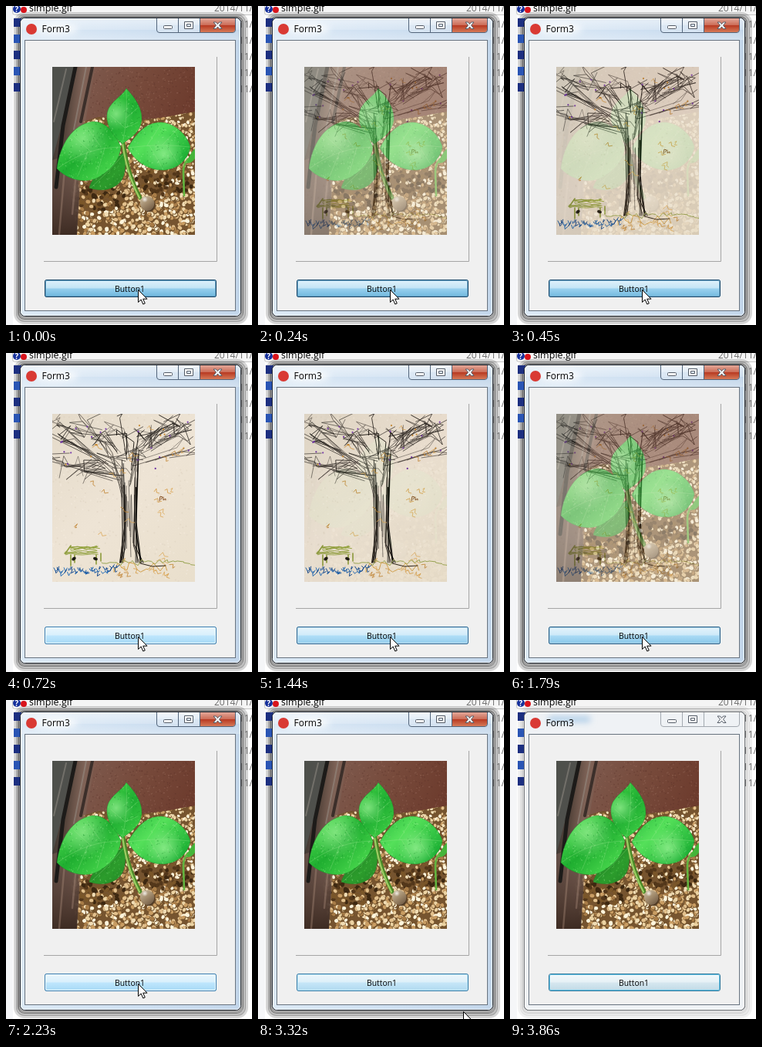
An HTML page with a canvas that plays this animation: 319x414 px, repeating every 3.91 s.

```html
<!DOCTYPE html>
<html lang="en">
<head>
<meta charset="utf-8">
<title>Form3</title>
<style>
html, body { margin: 0; width: 100%; height: 100%; overflow: hidden; background: #fff }
svg { position: absolute; left: 0; top: 0 }
canvas { position: absolute; left: 60px; top: 79px }
text { font-family: "Open Sans", "Noto Sans", sans-serif; font-size: 12px }
</style>
</head>
<body>
<svg width="319" height="414" viewBox="0 0 319 414">
  <defs>
    <linearGradient id="glass" x2="1" y2="0">
      <stop stop-color="#dce9f5"/><stop offset=".45" stop-color="#d0e1f2"/><stop offset="1" stop-color="#c3d6ea"/>
    </linearGradient>
    <linearGradient id="shine" x2="0" y2="1">
      <stop stop-color="#fff" stop-opacity=".5"/><stop offset=".5" stop-color="#fff" stop-opacity=".2"/>
      <stop offset=".52" stop-color="#fff" stop-opacity="0"/><stop offset="1" stop-color="#fff" stop-opacity=".25"/>
    </linearGradient>
    <linearGradient id="red" x2="0" y2="1">
      <stop stop-color="#e3a798"/><stop offset=".48" stop-color="#cc6d58"/>
      <stop offset=".52" stop-color="#b83a22"/><stop offset="1" stop-color="#d67a58"/>
    </linearGradient>
    <linearGradient id="normal" x2="0" y2="1">
      <stop stop-color="#f2f8fb"/><stop offset=".48" stop-color="#e6f1f6"/>
      <stop offset=".52" stop-color="#d6e7ef"/><stop offset="1" stop-color="#c0dae6"/>
    </linearGradient>
    <linearGradient id="hot" x2="0" y2="1">
      <stop stop-color="#eaf6fd"/><stop offset=".48" stop-color="#d9f0fc"/>
      <stop offset=".52" stop-color="#bee6fd"/><stop offset="1" stop-color="#a7d9f5"/>
    </linearGradient>
    <linearGradient id="down" x2="0" y2="1">
      <stop stop-color="#dff1fb"/><stop offset=".48" stop-color="#c0e3f5"/>
      <stop offset=".52" stop-color="#92cdec"/><stop offset="1" stop-color="#66b2da"/>
    </linearGradient>
    <filter id="blur" x="-50%" y="-20" width="200%" height="40" filterUnits="userSpaceOnUse"><feGaussianBlur stdDeviation="4"/></filter>
    <filter id="soft" x="0" y="0" width="319" height="60" filterUnits="userSpaceOnUse"><feGaussianBlur stdDeviation="4"/></filter>
    <path id="tabs" d="M195.500 16V31Q195.500 34.500 199 34.500H294Q297.500 34.500 297.500 31V16M223.500 16V34M251.500 16V34"/>
    <rect id="face" x="50.500" y="355.500" width="222" height="22" rx="2.500"/>
    <rect id="rim" x="51.500" y="356.500" width="220" height="20" rx="1.500" fill="none"/>
  </defs>

  <path d="M0 0H9V414H0Z" fill="#f5f6f8"/>
  <rect x="8.500" y="-9.500" width="330" height="21" rx="3" fill="#f5f5f5" stroke="#c4c4c4"/>
  <g id="shadow" fill="none" stroke="#000">
    <rect x="12" y="10" width="300" height="401" rx="12" stroke-width="4" opacity=".16"/>
    <rect x="15" y="13" width="294" height="395" rx="9" stroke-width="4" opacity=".25"/>
    <rect x="17" y="15" width="289" height="390" rx="7" stroke-width="4" opacity=".36"/>
  </g>
  <circle cx="14" cy="4" r="5" fill="#16309c"/>
  <text x="11.500" y="8" fill="#fff" style="font-size:10px;font-weight:700">?</text>
  <circle cx="23" cy="5" r="4" fill="#d8141c"/>
  <text x="30" y="7" style="font-size:12.500px">simple.gif</text>
  <g id="rows"></g>

  <rect x="18.500" y="15.500" width="286" height="387" rx="6" fill="url(#glass)" stroke="#1b2129"/>
  <rect x="19.500" y="16.500" width="284" height="385" rx="5" fill="none" stroke="#f5faff" opacity=".9"/>
  <path d="M20 21Q20 17 24 17H299Q303 17 303 21V44H20Z" fill="url(#shine)"/>
  <ellipse cx="64" cy="30" rx="30" ry="8" fill="#fff" filter="url(#soft)" opacity=".7"/>
  <path d="M252 16H297V31Q297 34 294 34H252Z" fill="url(#red)"/>
  <path d="M196 16H251V34H199Q196 34 196 31Z" fill="url(#shine)"/>
  <use href="#tabs" fill="none" stroke="#53657b"/>

  <g id="inactive">
    <rect x="18.500" y="15.500" width="286" height="387" rx="6" fill="#eff2f5" stroke="#6d7175"/>
    <rect x="19.500" y="16.500" width="284" height="385" rx="5" fill="none" stroke="#fff"/>
    <path d="M50 25H104" stroke="#9fc4e4" stroke-width="6" filter="url(#soft)"/>
    <use href="#tabs" fill="none" stroke="#a3a9b0"/>
  </g>

  <g fill="#fff" stroke="#535b66">
    <rect x="204.500" y="25.500" width="11" height="4" rx="1"/>
    <path fill-rule="evenodd" d="M231.500 20.500H242.500V29.500H231.500ZM234.500 23.500H239.500V26.500H234.500Z"/>
    <path d="M269 21H272.500L274.500 23.500L276.500 21H280L276.500 25L280 29.500H276.500L274.500 27L272.500 29.500H269L272.500 25Z"/>
  </g>
  <circle cx="33" cy="30" r="7" fill="#d93a34"/>
  <text x="46.500" y="34">Form3</text>

  <rect x="24.500" y="44.500" width="273" height="351" fill="#f0f0f0" stroke="#68737f"/>
  <path d="M49 331.500H273.500V66" fill="none" stroke="#a5a5a5"/>

  <use href="#face" fill="url(#normal)" stroke="#31789c"/>
  <use href="#rim" stroke="#62c0e2"/>
  <g id="hover">
    <use href="#face" fill="url(#hot)" stroke="#3c7fb1"/>
    <use href="#rim" stroke="#eefaff"/>
  </g>
  <g id="press">
    <use href="#face" fill="url(#down)" stroke="#17405f"/>
    <use href="#rim" stroke="#4f93bb"/>
  </g>
  <text x="160.500" y="371" text-anchor="middle" style="font-size:10.400px">Button1</text>
  <path id="cursor" d="M.5.500V16.500L4.200 13L6.800 19L9.300 18L6.700 12.200H12Z" fill="#fff" stroke="#000"/>
</svg>
<canvas id="plant" width="185" height="218"></canvas>
<canvas id="tree" width="185" height="218"></canvas>

<script>
const $ = id => document.getElementById(id);
const LOOP = 3910;
let seed = 77;
const rnd = (a = 0, b = 1) => {
  seed = seed * 16807 % 2147483647;
  return a + (b - a) * seed / 2147483647;
};
const pick = list => list[Math.floor(rnd(0, list.length))];

// both pictures are drawn in stage coordinates
function context(id) {
  const c = $(id).getContext('2d');
  c.translate(-60, -79);
  c.lineCap = c.lineJoin = 'round';
  return c;
}
function fill(c, path, color) {
  c.fillStyle = color;
  c.fill(new Path2D(path));
}
function stroke(c, path, color, width = 1) {
  c.strokeStyle = color;
  c.lineWidth = width;
  c.stroke(new Path2D(path));
}
function gradient(c, x1, y1, x2, y2, ...colors) {
  const g = c.createLinearGradient(x1, y1, x2, y2);
  colors.forEach((color, i) => g.addColorStop(i / (colors.length - 1), color));
  return g;
}
function dot(c, x, y, rx, ry, color) {
  c.fillStyle = color;
  c.beginPath();
  c.ellipse(x, y, rx, ry, rnd(0, 3), 0, 7);
  c.fill();
}
function glow(c, x, y, r, color) {
  const g = c.createRadialGradient(x, y, 0, x, y, r);
  g.addColorStop(0, color);
  g.addColorStop(1, color.slice(0, 7) + '00');
  c.fillStyle = g;
  c.fillRect(x - r, y - r, 2 * r, 2 * r);
}
const inside = (x, y, cx, cy, rx, ry) => ((x - cx) / rx) ** 2 + ((y - cy) / ry) ** 2 < 1;

function drawPlant() {
  const c = context('plant');
  fill(c, 'M60 79H245V297H60Z', gradient(c, 100, 79, 245, 140, '#7d5a4e', '#774a3b', '#6c3a2c'));
  for (let i = 0; i < 400; i++)
    dot(c, rnd(110, 245), rnd(79, 150), .8, .8, pick(['#9a6f6066', '#57302766']));

  c.save();
  c.clip(new Path2D('M245 137L208 144L175 148L120 144L100 150L96 205L84 240L92 297H245Z'));
  fill(c, 'M60 130H245V297H60Z', '#76542f');
  for (let i = 0; i < 1500; i++) {
    const x = rnd(80, 247), y = rnd(135, 299);
    const dark = inside(x, y, 206, 228, 38, 17) || inside(x, y, 122, 250, 34, 17);
    if (dark && rnd() < .7) dot(c, x, y, 3, 2.3, pick(['#3d2811', '#53371a', '#7a5629']));
    else {
      const r = rnd(1.5, 2.4) + (y - 135) / 170;
      dot(c, x + .6, y + .8, r, r, '#70502a');
      dot(c, x, y, r, r * .8, pick(['#f0dcb4', '#e2c08c', '#c99d63', '#fff5dc', '#ecd3a3', '#a97d48']));
    }
  }
  c.restore();

  // glass tank on the left
  fill(c, 'M60 79H116L103 150L98 215L92 297H60Z', gradient(c, 60, 160, 112, 165, '#3e3733', '#55443b', '#80665acc', '#80665a00'));
  fill(c, 'M60 200L90 190L95 240L92 297H60Z', gradient(c, 60, 200, 70, 297, '#725950aa', '#3e2c23'));
  fill(c, 'M60 79H88L76 140L60 200Z', '#50524eee');
  stroke(c, 'M90 79L74 155L65 235', '#1d1b19', 5);
  stroke(c, 'M112 79L97 150', '#3c2f2a', 4);
  stroke(c, 'M78 82L62 150M104 79L88 160', '#9a948c77', 2);
  stroke(c, 'M77 200L69 296M92 205L86 270', '#a8897966', 2.5);

  stroke(c, 'M242 195Q230 200 230 216L231 246', '#63b53f', 2.6);
  fill(c, 'M245 185C240 190 236 197 234 204C240 204 243 201 245 198Z', '#44b53a');
  leaf(c, 'M152 191C140 198 112 218 108 236C125 242 145 238 152 222C156 210 155 200 152 191Z', '#2c9c2c', '#1b7420', 'M152 193Q135 213 111 235');
  stroke(c, 'M152 178Q156 205 163 224Q168 238 174 249', '#4a8a28', 5);
  stroke(c, 'M151 178Q155 205 162 224Q167 238 173 249', '#9ccd63', 2.2);
  dot(c, 185, 258, 9, 8, '#4d3925');
  fill(c, 'M174 253C176 245 186 245 191 251C195 258 190 266 183 266C177 265 173 260 174 253Z', gradient(c, 176, 247, 190, 266, '#cbbb9e', '#a08a6c', '#6b553f'));
  glow(c, 180, 251, 4, '#ffffffcc');
  leaf(c, 'M149 183C140 160 126 149 112 150C86 154 70 180 66 211C80 226 105 232 122 221C140 210 147 198 149 183Z', '#4ddb50', '#1fae30', 'M149 183Q105 183 68 210M123 183L105 157M109 188L88 169M128 184L118 218M106 189L93 221');
  leaf(c, 'M158 184C168 166 182 150 202 151C222 153 236 170 239 183C236 200 222 212 204 213C182 213 166 200 158 184Z', '#55e05a', '#1fb236', 'M158 184Q200 178 238 183M183 181L200 155M203 180L222 160M186 181L202 209M208 181L223 204');
  leaf(c, 'M151 179C132 165 126 142 135 130C142 120 152 115 156 107C164 116 177 130 176 148C174 165 160 172 151 179Z', '#47d64a', '#1fae32', 'M151 179Q158 145 156 109M154 158L136 142M156 145L171 132M155 158L171 151');
}

function leaf(c, path, light, dark, veins) {
  fill(c, path, gradient(c, 110, 120, 205, 220, light, dark, light, dark));
  c.save();
  c.clip(new Path2D(path));
  if (light > '#3') [[100, 172, 34], [205, 192, 26], [143, 140, 22]].forEach(([x, y, r]) => glow(c, x, y, r, '#b4ffaa99'));
  for (let i = 0; i < 1100; i++)
    dot(c, rnd(62, 242), rnd(105, 240), rnd(.5, 1.5), .6, pick(['#b4f5a855', '#10842455', '#66e06055']));
  stroke(c, veins, '#a5ea9866', .7);
  c.restore();
  stroke(c, path, '#1a7a2266', .8);
}

// a bundle of jittered thin strokes along a branch, each ending in twigs
function branch(c, x1, y1, x2, y2) {
  for (let n = 0; n < 4; n++) {
    const a = rnd(0, .5), b = rnd(.6, 1), j = () => rnd(-5, 5);
    const at = k => [x1 + (x2 - x1) * k + j(), y1 + (y2 - y1) * k + j()];
    const q = at(b), twig = () => [q[0] + rnd(-26, 26), q[1] + rnd(-16, 16)];
    stroke(c, `M${at(a)}L${q}L${twig()}L${twig()}`, pick(['#16130f', '#302b27', '#5a534c']), rnd(.5, .95));
  }
}
function scribble(c, x1, x2, y, rise, step, color) {
  let d = `M${x1} ${y}`;
  for (let x = x1; x < x2; x += step) d += `L${x + rnd(-2, 3)} ${y + rnd(-rise, rise)}`;
  stroke(c, d, color, 1);
}

function drawTree() {
  const c = context('tree');
  fill(c, 'M60 79H245V297H60Z', gradient(c, 60, 79, 245, 297, '#e4dac9', '#eee4d5', '#e9dfcc'));
  for (let i = 0; i < 500; i++)
    dot(c, rnd(60, 245), rnd(79, 297), 1, 1, pick(['#f5ede088', '#d9cdbb66']));

  [[150, 165, 62, 84], [148, 155, 62, 107], [149, 165, 62, 139], [150, 150, 98, 80], [150, 160, 105, 150],
   [152, 140, 124, 98], [130, 110, 66, 94], [125, 145, 70, 144], [157, 150, 152, 82], [160, 160, 173, 98],
   [163, 145, 212, 83], [164, 140, 244, 94], [164, 145, 242, 119], [168, 125, 243, 100], [166, 130, 200, 95],
   [170, 120, 225, 84], [154, 185, 135, 130], [163, 180, 170, 125]]
    .forEach(b => branch(c, ...b));

  for (let i = 0; i < 16; i++) {
    const left = i < 8, x = left ? rnd(151, 155) : rnd(164, 169), foot = left ? rnd(147, 154) : rnd(167, 178);
    const top = rnd(125, 200), mid = rnd(205, 255);
    stroke(c, `M${x + (left ? -3 : 3) * (180 - top) / 40} ${top}L${x} ${mid}L${foot} 272`, pick(['#000', '#14100c', '#2a241f']), rnd(.6, 1.2));
  }
  for (let i = 0; i < 6; i++)
    stroke(c, `M${rnd(156, 163)} ${rnd(160, 200)}L${rnd(156, 165)} ${rnd(225, 270)}`, '#34302c', .6);

  // falling leaves and blossoms
  for (let i = 0; i < 36; i++) {
    const low = i > 20, x = low ? rnd(140, 215) : rnd(70, 235), y = low ? rnd(262, 290) : rnd(90, 245);
    stroke(c, `M${x} ${y}l${rnd(2, 6)} ${rnd(-5, 1)}l${rnd(-3, 3)} 5l${rnd(2, 5)} ${rnd(-2, 2)}`, pick(['#d59a42', '#dca95a', '#c08330']), .8);
  }
  for (let i = 0; i < 28; i++)
    dot(c, i % 2 ? rnd(64, 145) : rnd(168, 240), rnd(88, 152), 1.1, 1.1, pick(['#6a2da0', '#7b3fae', '#c78a35']));
  stroke(c, 'M199 192L200 186L203 187L201 190M204 187V191L207 189V191', '#875125');

  scribble(c, 124, 245, 272, 4, 4, '#98a452');
  scribble(c, 140, 212, 278, 7, 5, '#d3a14c');
  stroke(c, 'M174 273L190 277L207 276', '#2b231a');
  for (let i = 0; i < 5; i++) {
    scribble(c, 84, 124, 251 + i, 2, 7, '#94a33f');
    scribble(c, 77, 123, 258 + i * .7, 1.5, 8, '#a0ab55');
  }
  stroke(c, 'M84 250L77 260M84 262V276M89 262V272M117 262V274M123 260V270', '#8c9b3b', 1.6);
  dot(c, 88, 267, 2, 3, '#1c1a12');
  dot(c, 116, 267, 2, 3, '#1c1a12');
  for (let x = 62; x < 145; x += 2.2) {
    const y = 281 - Math.max(0, x - 115) * .12;
    stroke(c, `M${x} ${y + rnd(-4, 4)}l${rnd(-2, 3)} ${rnd(2, 6)}l${rnd(1, 4)} ${rnd(-5, 0)}`, pick(['#1d5fa9', '#2b70b8', '#174b90']));
  }
}

// value at t along [time, value] pairs
function track(t, ...keys) {
  const i = keys.findIndex(k => t < k[0]);
  if (i < 0) return keys.at(-1)[1];
  if (!i) return keys[0][1];
  const [a, u] = keys[i - 1], [b, v] = keys[i];
  return u + (v - u) * (t - a) / (b - a);
}
const clamp = v => Math.min(1, Math.max(0, v));

function treeOpacity(t) {
  if (t < 90) return 0;
  if (t < 1440) return clamp((Math.floor((t - 90) / 72) + 1) / 7);
  return clamp(1 - (Math.floor((t - 1440) / 70) + .4) / 10);
}

function render(now) {
  const t = now % LOOP;
  $('tree').style.opacity = treeOpacity(t);
  $('press').style.opacity = track(t, [0, .9], [450, .8], [600, .65], [720, 0], [1439, 0], [1440, .3], [1790, .45], [1880, .45], [2230, 0]);
  $('hover').style.opacity = track(t, [3319, 1], [3320, .65], [3560, 0]);
  const away = t < 3710 ? 0 : clamp((Math.floor((t - 3710) / 75) + 1) / 3);
  $('inactive').style.opacity = away;
  $('shadow').style.opacity = 1 - .65 * away;
  $('cursor').setAttribute('transform', t < 3320 ? 'translate(171 368)' : 'translate(266 404)');
  $('cursor').style.display = t < 3380 ? '' : 'none';
  requestAnimationFrame(render);
}

let rows = '';
for (let i = 0; i < 5; i++)
  rows += `<rect x="10" y="${16 + i * 21}" width="10" height="11" fill="${i % 2 ? '#2a55b4' : '#1c2f80'}"/>`;
for (let i = 0; i < 6; i++)
  rows += `<text x="270" y="${7 + i * 21}" fill="#6d6d6d">2014/11/</text>`;
$('rows').innerHTML = rows;
drawPlant();
drawTree();
render(performance.now());
</script>
</body>
</html>
```
